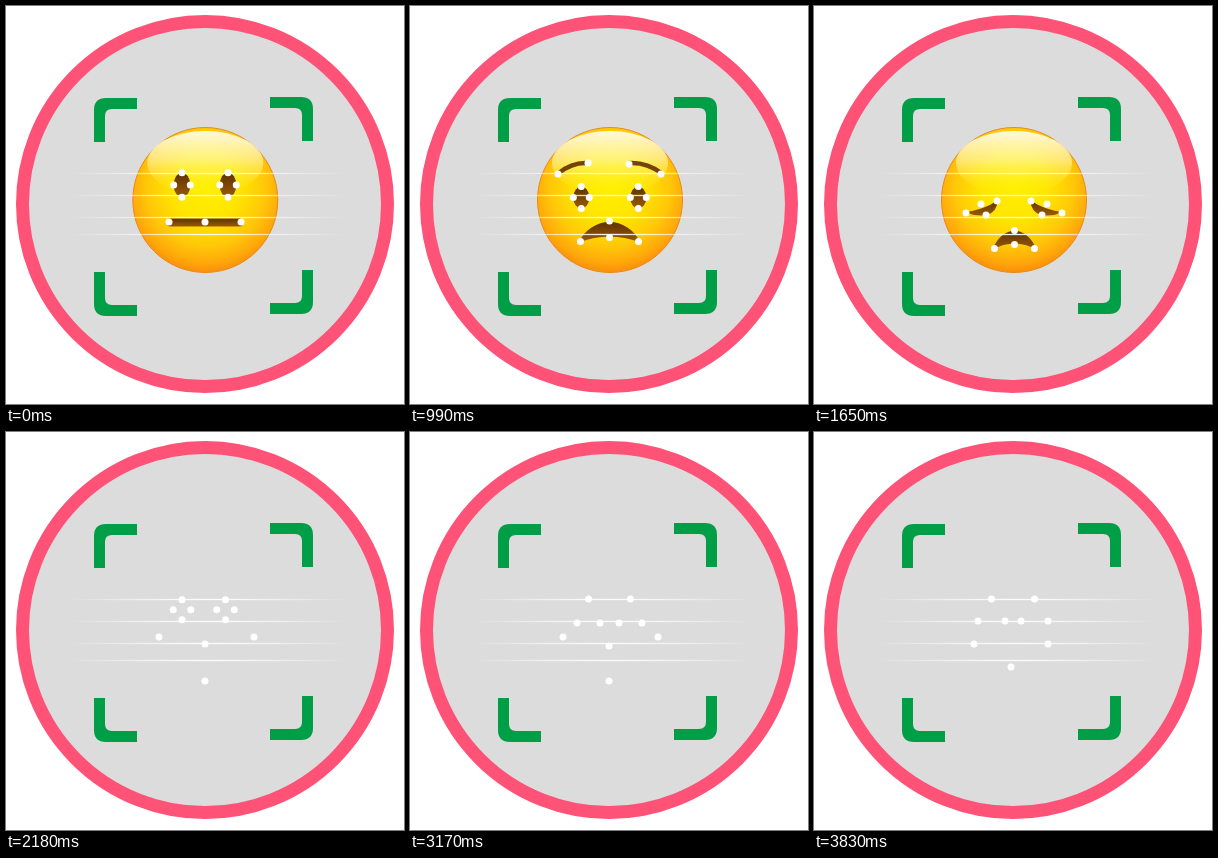
An HTML page for the animation above (3.96 s loop, 398 px wide and 398 px high).

```html
<!DOCTYPE html>
<html lang="en">
<head>
<meta charset="utf-8">
<title>Face scan</title>
<style>
html, body { margin: 0; width: 100%; height: 100%; overflow: hidden; background: #fff; }
svg { display: block; width: 100vw; height: 100vh; }
.face, .marks { visibility: hidden; }
.on { visibility: visible; }
</style>
</head>
<body>
<svg id="stage" viewBox="0 0 398 398">
  <defs>
    <radialGradient id="skin" gradientUnits="userSpaceOnUse" cx="200" cy="181" r="87">
      <stop offset="0" stop-color="#fff000"/>
      <stop offset=".38" stop-color="#ffe500"/>
      <stop offset=".68" stop-color="#ffc808"/>
      <stop offset=".88" stop-color="#ffa60a"/>
      <stop offset="1" stop-color="#f98a0c"/>
    </radialGradient>
    <linearGradient id="shine" x1="0" y1="0" x2="0" y2="1">
      <stop offset="0" stop-color="#fffdf0" stop-opacity=".92"/>
      <stop offset=".45" stop-color="#fffbc0" stop-opacity=".6"/>
      <stop offset="1" stop-color="#fff200" stop-opacity="0"/>
    </linearGradient>
    <linearGradient id="brown" x1="0" y1="0" x2="0" y2="1">
      <stop offset="0" stop-color="#5e3200"/>
      <stop offset="1" stop-color="#9a5a05"/>
    </linearGradient>
    <radialGradient id="blush">
      <stop offset="0" stop-color="#ff5030" stop-opacity=".6"/>
      <stop offset="1" stop-color="#ff7020" stop-opacity="0"/>
    </radialGradient>
    <linearGradient id="beam">
      <stop offset="0" stop-color="#fff" stop-opacity="0"/>
      <stop offset=".25" stop-color="#fff" stop-opacity=".55"/>
      <stop offset=".5" stop-color="#fff" stop-opacity=".95"/>
      <stop offset=".75" stop-color="#fff" stop-opacity=".55"/>
      <stop offset="1" stop-color="#fff" stop-opacity="0"/>
    </linearGradient>
  </defs>
  <circle cx="199" cy="198" r="182.5" fill="#dcdcdc" stroke="#ff5277" stroke-width="13"/>
  <g id="corners" fill="#009e47"></g>
  <g id="faces"></g>
  <g id="beams"></g>
  <g id="dots" fill="#fff"></g>
</svg>
<script>
const SHOW = 200, CYCLE = 330, BROWN = '#74420a';
const $ = id => document.getElementById(id);

const shape = (d, fill = 'url(#brown)') => `<path d="${d}" fill="${fill}"/>`;
const stroke = (d, w) =>
  `<path d="${d}" fill="none" stroke="${BROWN}" stroke-width="${w}" stroke-linecap="round"/>`;
const ellipse = (x, y, rx, ry, fill = 'url(#brown)') =>
  `<ellipse cx="${x}" cy="${y}" rx="${rx}" ry="${ry}" fill="${fill}"/>`;

// Each feature returns its drawing and the tracking points on it.
const part = (art, dots = []) => ({ art, dots });

const ovals = (left, right, y, rx, ry) => part(
  [left, right].map(x => ellipse(x, y, rx, ry)).join(''),
  [left, right].flatMap(x => [[x, y - ry], [x - rx, y], [x + rx, y], [x, y + ry]]));

const arches = (left, right, top, base, w) => part(
  [left, right].map(x =>
    stroke(`M${x - w} ${base}Q${x} ${2 * top - base} ${x + w} ${base}`, 6)).join(''),
  [left, right].flatMap(x => [[x, top], [x - w, base], [x + w, base]]));

const lids = y => part(
  [0, 1].map(m => `<g transform="translate(${m ? 400 : 0} ${y - 207}) scale(${m ? -1 : 1} 1)">` +
    shape('M151 206Q170 204 184 194Q183 206 173 209Q162 211 151 206Z') + '</g>').join(''),
  [[152, 0], [167, -9], [183, -12], [172, 2]]
    .flatMap(([x, dy]) => [[x, y + dy], [400 - x, y + dy]]));

const brows = () => part(
  stroke('M149 167Q162 156 178 157', 4.5) + stroke('M219 157Q237 156 251 167', 4.5),
  [[148, 168], [178, 157], [219, 158], [251, 168]]);

const flat = () => part(
  '<rect x="161" y="212.5" width="76" height="8" rx="3" fill="url(#brown)"/>',
  [[163, 216], [199, 216], [235, 216]]);

const skew = () => part(
  stroke('M167 228Q178 215 199 214T232 217', 6),
  [[167, 228], [199, 214], [232, 217]]);

const bow = (x, y, w, mid) => part(
  stroke(`M${x - w} ${y}Q${x} ${2 * mid - y} ${x + w} ${y}`, 6),
  [[x - w, y], [x, mid], [x + w, y]]);

const frown = (x, y, w, top, inner) => part(
  shape(`M${x - w - 2} ${y + 1}C${x - w * .6} ${top - 6} ${x + w * .6} ${top - 6} ${x + w + 2} ${y + 1}` +
    `Q${x} ${2 * inner - y - 3} ${x - w - 2} ${y + 1}Z`),
  [[x - w, y], [x, top], [x + w, y], [x, inner]]);

const grin = (top, teeth = 0) => {
  const lip = `M152 204Q200 ${2 * top - 204} 249 204`;
  const row = top + 10 + teeth;
  return part(
    shape(`${lip}C246 264 155 264 152 204Z`) +
    ellipse(200, 244, 24, 5, '#ee4a3c') +
    shape(`M156 207Q200 ${2 * top - 203} 245 207Q243 ${row - 6} 235 ${row - 1}` +
      `Q200 ${row + 5} 166 ${row - 1}Q158 ${row - 6} 156 207Z`, '#fff'),
    [[153, 205], [248, 205], [199, top], [199, 249]]);
};

const cheeks = () => part(
  ellipse(150, 207, 19, 14, 'url(#blush)') + ellipse(249, 207, 19, 14, 'url(#blush)'));

const faces = [
  [ovals(176, 222, 179, 8.3, 12.2), flat()],
  [ovals(176.5, 220.5, 178.5, 9, 11.3), skew()],
  [ovals(176.5, 220.5, 178.5, 9, 11.3), bow(199, 232, 30, 217)],
  [brows(), ovals(171.3, 228.3, 191.5, 8, 11), frown(199.5, 235.5, 29, 215, 231.5)],
  [lids(199), bow(200, 237, 22, 227)],
  [lids(207), frown(200.5, 242.5, 20, 224.5, 238.5)],
  [ovals(176, 219.5, 177.7, 8.8, 10), grin(212)],
  [ovals(176, 219.5, 177.7, 8.8, 10), grin(212, 6)],
  [arches(178.5, 220.5, 167, 191, 11.5), grin(213, 14)],
  [arches(178.5, 220.5, 167, 191, 11.5), grin(214)],
  [cheeks(), arches(177.5, 220.5, 167, 189, 13.5), bow(197, 212, 37, 238)],
  [cheeks(), arches(177.5, 220.5, 167, 189, 13.5), bow(197, 212, 37, 235)]
];

const head = x => `<circle cx="${x}" cy="194" r="72.5" fill="url(#skin)" stroke="#e98a1c" stroke-width="1"/>` +
  ellipse(x, 157, 58, 32, 'url(#shine)');

$('faces').innerHTML = faces.map((f, i) =>
  `<g class="face">${head(i ? 200 : 199.3)}${f.map(p => p.art).join('')}</g>`).join('');

$('dots').innerHTML = faces.map(f => '<g class="marks">' + f.flatMap(p => p.dots)
  .map(([x, y]) => `<circle cx="${x}" cy="${y}" r="3.5"/>`).join('') + '</g>').join('');

$('beams').innerHTML = [167, 189, 211, 228].map(y =>
  `<rect x="62" y="${y}" width="280" height="1" fill="url(#beam)"/>` +
  `<rect x="62" y="${y - 1}" width="280" height="3" fill="url(#beam)" opacity=".16"/>`).join('');

const corner = 'M0 44V12Q0 0 12 0H43V11H18Q11 11 11 18V44Z';
$('corners').innerHTML = [[88, 92, 1, 1], [307, 91, -1, 1], [88, 310, 1, -1], [307, 308, -1, -1]]
  .map(([x, y, sx, sy]) =>
    `<path d="${corner}" transform="translate(${x} ${y}) scale(${sx} ${sy})"/>`).join('');

const faceEls = [...document.querySelectorAll('.face')];
const markEls = [...document.querySelectorAll('.marks')];
const start = performance.now();

function draw() {
  const t = (performance.now() - start) % (CYCLE * faces.length);
  const now = Math.floor(t / CYCLE);
  const visible = t % CYCLE < SHOW;
  faceEls.forEach((el, i) => el.classList.toggle('on', i === now && visible));
  markEls.forEach((el, i) => el.classList.toggle('on', i === now));
  requestAnimationFrame(draw);
}
draw();
</script>
</body>
</html>
```
